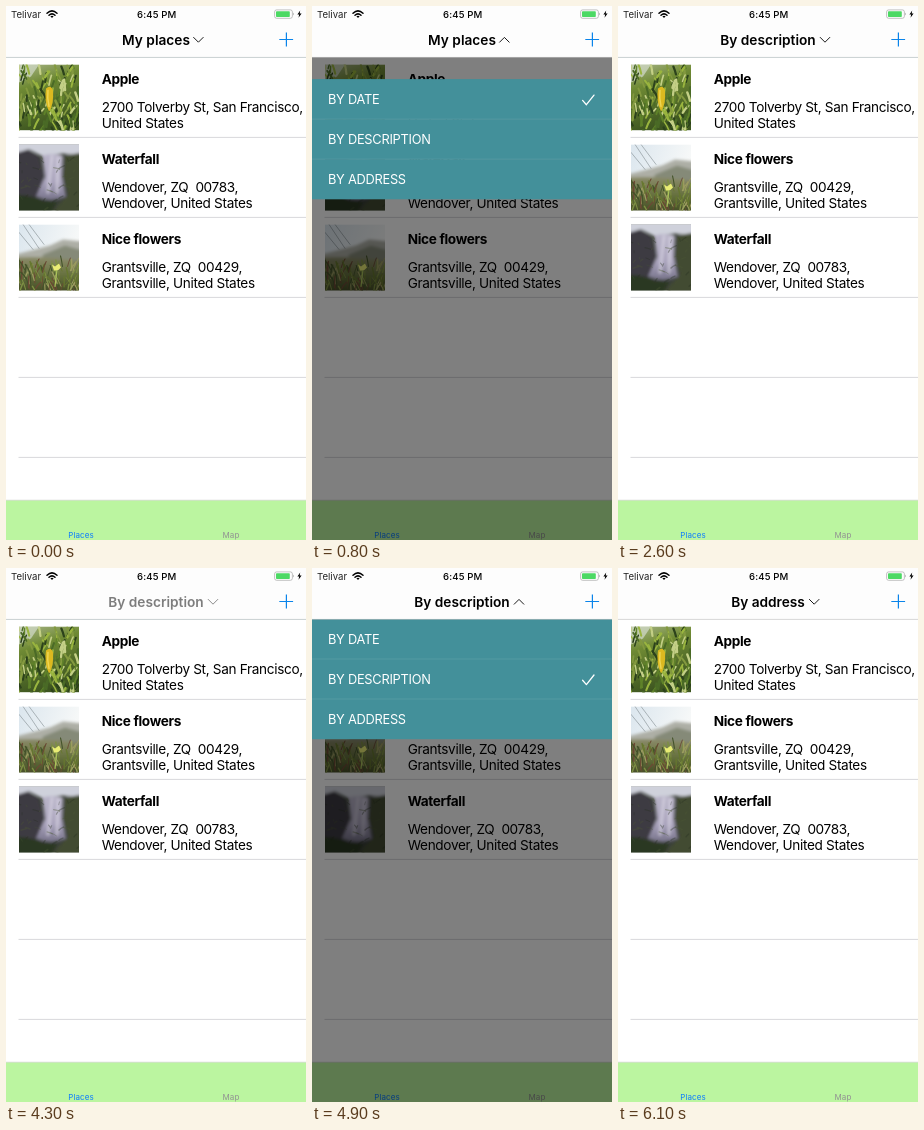
Write an HTML page that moves like this. It is 300 px wide and 534 px high and loops after 8 s.

```html
<!DOCTYPE html>
<html lang="en">
<head>
<meta charset="utf-8">
<title>Places</title>
<style>
  html, body { margin: 0; height: 100%; overflow: hidden; background: #fff; }
  svg { display: block; width: 100vw; height: 100vh; font-family: Inter, Roboto, sans-serif; }
  .cell { font-size: 13.6px; letter-spacing: -.33px; }
  .name { font-weight: 700; }
  .menu { font-size: 12.8px; letter-spacing: -.25px; fill: #fff; }
  .title { font-size: 13.7px; font-weight: 600; text-anchor: middle; }
  .status { font-size: 9.6px; }
  .tab { font-size: 8px; text-anchor: middle; letter-spacing: .1px; }
  .line { fill: none; stroke-linecap: round; stroke-linejoin: round; }
</style>
</head>
<body>
<svg viewBox="0 0 300 534">
  <defs>
    <clipPath id="photo"><rect width="60" height="66"/></clipPath>
    <filter id="soft"><feGaussianBlur stdDeviation="1.6"/></filter>
    <linearGradient id="leaves" x2=".3" y2="1">
      <stop offset="0" stop-color="#a9b58a"/><stop offset=".35" stop-color="#6f8a34"/><stop offset="1" stop-color="#3d5520"/>
    </linearGradient>
    <linearGradient id="fall" x2="0" y2="1">
      <stop offset="0" stop-color="#b9b4c8"/><stop offset=".6" stop-color="#aaa4bd"/><stop offset="1" stop-color="#77738a"/>
    </linearGradient>
    <linearGradient id="sky" x2="1" y2=".4">
      <stop offset="0" stop-color="#dbe6ee"/><stop offset="1" stop-color="#f9faf9"/>
    </linearGradient>
    <linearGradient id="meadow" x2="0" y2="1">
      <stop offset="0" stop-color="#8b8b6a"/><stop offset=".5" stop-color="#65703d"/><stop offset="1" stop-color="#3f4622"/>
    </linearGradient>
  </defs>

  <rect width="300" height="534" fill="#fff"/>
  <path id="rules" stroke="#c8c7cc" stroke-width=".7"/>
  <g id="list"></g>

  <rect y="494.4" width="300" height="39.6" fill="#bbf5a0"/>
  <path d="M0 494.2H300" stroke="#b2b2b2" stroke-width=".4"/>
  <text class="tab" x="75" y="531.5" fill="#0a7aff">Places</text>
  <text class="tab" x="225" y="531.5" fill="#929292">Map</text>

  <rect id="shade" y="51" width="300" height="483" fill="#000"/>
  <g id="menu"></g>

  <rect width="300" height="51.2" fill="#fdfdfd"/>
  <path d="M0 51.4H300" stroke="#b2b2b2" stroke-width=".5"/>
  <text class="status" x="5" y="11.7" fill="#222">Telivar</text>
  <path class="line" d="M41 7.2Q46 2.6 51 7.2M43 9.2Q46 6.6 49 9.2" stroke="#000" stroke-width="1.5"/>
  <path d="M44.4 10.3Q46 9 47.6 10.3L46 12Z"/>
  <text class="status" x="150.7" y="11.7" font-weight="500" letter-spacing=".1" text-anchor="middle">6:45 PM</text>
  <rect x="268.6" y="3.9" width="17.8" height="8.4" rx="2" fill="none" stroke="#999" stroke-width=".6"/>
  <rect x="270" y="5.2" width="13.8" height="5.8" rx=".8" fill="#4cd964"/>
  <path d="M287.2 6.6Q288.8 8.1 287.2 9.6Z" fill="#999"/>
  <path d="M294.2 4.4L291.4 8.6H293.2L292.5 11.8L295.6 7.4H293.7Z"/>

  <g id="heading">
    <text id="title" class="title" x="150" y="38.8"></text>
    <path id="chevron" class="line" d="M-4.8 -2.4L0 2.4L4.8 -2.4" stroke="#000" stroke-width=".9"/>
  </g>
  <path d="M273.3 33.5H287.1M280.4 26.6V40.4" stroke="#0a84ea" stroke-width="1.2"/>
</svg>

<script>
const LOOP = 8000, MENU_HEIGHT = 120, NAV_BOTTOM = 51;
const $ = id => document.getElementById(id);
const clamp = v => Math.min(1, Math.max(0, v));
const ease = v => { v = clamp(v); return v * v * (3 - 2 * v); };
const range = n => [...Array(n).keys()];

let seed = 7;
const random = (min, max) => {
  seed = seed * 16807 % 2147483647;
  return min + (max - min) * seed / 2147483647;
};

// Loose upright strokes scattered between two heights of a photo.
function blades(count, top, bottom, colors, length, width) {
  return range(count).map(i => {
    const x = random(0, 60), y = random(top, bottom);
    const lean = random(-6, 6), rise = random(length / 2, length);
    return `<path class="line" d="M${x} ${y}q${lean / 3} ${-rise / 2} ${lean} ${-rise}"
      stroke="${colors[i % colors.length]}" stroke-width="${random(width / 2, width)}"/>`;
  }).join('');
}

const peppers = `<rect width="60" height="66" fill="url(#leaves)"/>
  <path d="M0 0H20L12 12L0 18Z" fill="#d3dccb" opacity=".7"/>
  ${blades(150, 4, 72, ['#9ab53f', '#4a6a26', '#c3cf86', '#5f8229', '#2c421b', '#83993f'], 11, 2.6)}
  <path d="M27 24Q32 20 34 26Q35 40 30 47Q25 37 27 24Z" fill="#dcb920"/>
  <path d="M29 26Q28 34 30 42" class="line" stroke="#efd652" stroke-width="1.5"/>`;

const waterfall = `<rect width="60" height="66" fill="#3a3f38"/>
  <g filter="url(#soft)">
    <path d="M-4 -4H64V12L44 9L24 12L10 5L-4 9Z" fill="#cfd1db"/>
    <path d="M-4 9L9 5L19 12L25 30L19 52L-4 58Z" fill="#3e3a42"/>
    <path d="M23 11Q33 8 44 11L43 32L47 52Q32 59 17 52L26 32Z" fill="url(#fall)"/>
    <path d="M33 12L29 48M39 13L38 48" class="line" stroke="#dddbe8" stroke-width="3" opacity=".6"/>
    <path d="M46 11L64 8V70H31L49 50L44 32Z" fill="#434c33"/>
    <path d="M-4 50Q15 51 24 56L38 57L32 70H-4Z" fill="#2b3723"/>
  </g>
  ${blades(40, 14, 68, ['#4a5635', '#262e22'], 3, 1.6).replace(/class="line"/g, 'class="line" opacity=".35"')}`;

const flowers = `<rect width="60" height="66" fill="url(#sky)"/>
  <g filter="url(#soft)">
    <path d="M-4 30L16 25L31 21L44 15L64 17V50H-4Z" fill="#adafa6"/>
    <path d="M24 30L46 21L64 26V45H20Z" fill="#858a78"/>
    <path d="M-4 33Q28 31 64 37V70H-4Z" fill="url(#meadow)"/>
  </g>
  ${blades(100, 42, 70, ['#7d8f43', '#44532a', '#9c9c60', '#6b4a34', '#66772f'], 12, 1.5)}
  <path d="M4 0L20 24M10 0L25 20M0 8L14 25" class="line" stroke="#6d767a" stroke-width=".5"/>
  <path d="M38 45L36 62" class="line" stroke="#a9c45a" stroke-width="1.2"/>
  <path d="M33 40L36 42L40 39L42 43Q39 47 35 46Z" fill="#e9ec75"/>`;

const places = [
  ['Apple', '2700 Tolverby St, San Francisco,', 'United States', peppers],
  ['Waterfall', 'Wendover, ZQ\u00a0 00783,', 'Wendover, United States', waterfall],
  ['Nice flowers', 'Grantsville, ZQ\u00a0 00429,', 'Grantsville, United States', flowers],
];
const orders = [[0, 1, 2], [0, 2, 1], [0, 2, 1]];
const titles = ['My places', 'By description', 'By address'];
const chevronX = [192.4, 207, 196.2];

$('rules').setAttribute('d', range(5).map(i => `M12.5 ${131.4 + 80 * i}H300`).join(''));
$('list').innerHTML = places.map(([name, street, country, photo]) => `<g class="cell">
  <g transform="translate(13 7.4)" clip-path="url(#photo)">${photo}</g>
  <text class="name" x="95.7" y="26.8">${name}</text>
  <text x="95.7" y="54.6">${street}</text>
  <text x="95.7" y="70.8">${country}</text></g>`).join('');

$('menu').innerHTML = ['BY DATE', 'BY DESCRIPTION', 'BY ADDRESS'].map((label, i) => `
  <g transform="translate(0 ${40 * i})">
    <rect class="option" width="300" height="40.2"/>
    ${i ? '<path d="M0 0H300" stroke="#61a3aa" stroke-width=".5"/>' : ''}
    <text class="menu" x="16" y="25.4">${label}</text>
    <path class="check line" d="M270.6 21.3L274.4 25.6L282 16" stroke="#fff" stroke-width="1.3"/>
  </g>`).join('');

const rows = [...$('list').children];
const options = [...document.querySelectorAll('.option')];
const checks = [...document.querySelectorAll('.check')];

// Menu displacement, in menu heights, while it drops in and bounces.
function spring(seconds) {
  const decay = 7, speed = 13;
  return -Math.exp(-decay * seconds) *
    (Math.cos(speed * seconds) + decay / speed * Math.sin(speed * seconds));
}

function menuShift(sinceOpen, closing) {
  if (sinceOpen < 100) return -1;
  if (closing > 0) return -closing;
  return sinceOpen < 600 ? spring((sinceOpen - 60) / 1000) : 0;
}

function render(t) {
  const second = t >= 4300;
  const [open, close, checked, picked] = second ? [4300, 5600, 1, 2] : [500, 2100, 0, 1];
  const choice = t < 2100 ? 0 : t < 5600 ? 1 : 2;
  const sinceOpen = t - open;
  const closing = ease((t - close) / 500);
  const shown = ease(sinceOpen / 300) - closing;

  rows.forEach((row, i) =>
    row.setAttribute('transform', `translate(0 ${NAV_BOTTOM + 80 * orders[choice].indexOf(i)})`));
  options.forEach((option, i) =>
    option.setAttribute('fill', t >= close && i === picked ? '#dcd9dd' : '#43909a'));
  checks.forEach((check, i) => check.setAttribute('opacity', i === checked ? 1 : 0));

  const y = NAV_BOTTOM + MENU_HEIGHT * menuShift(sinceOpen, closing);
  $('menu').setAttribute('transform', `translate(0 ${y})`);
  $('shade').setAttribute('opacity', .5 * shown);
  $('title').textContent = titles[choice];
  $('chevron').setAttribute('transform', `translate(${chevronX[choice]} 33.8) rotate(${180 * shown})`);
  $('heading').setAttribute('opacity', sinceOpen >= 0 && sinceOpen < 100 ? .5 : 1);
}

const start = performance.now();
function tick() {
  const t = (performance.now() - start) % LOOP;
  render(Math.floor(t / 100) * 100);
  requestAnimationFrame(tick);
}
tick();
</script>
</body>
</html>
```
